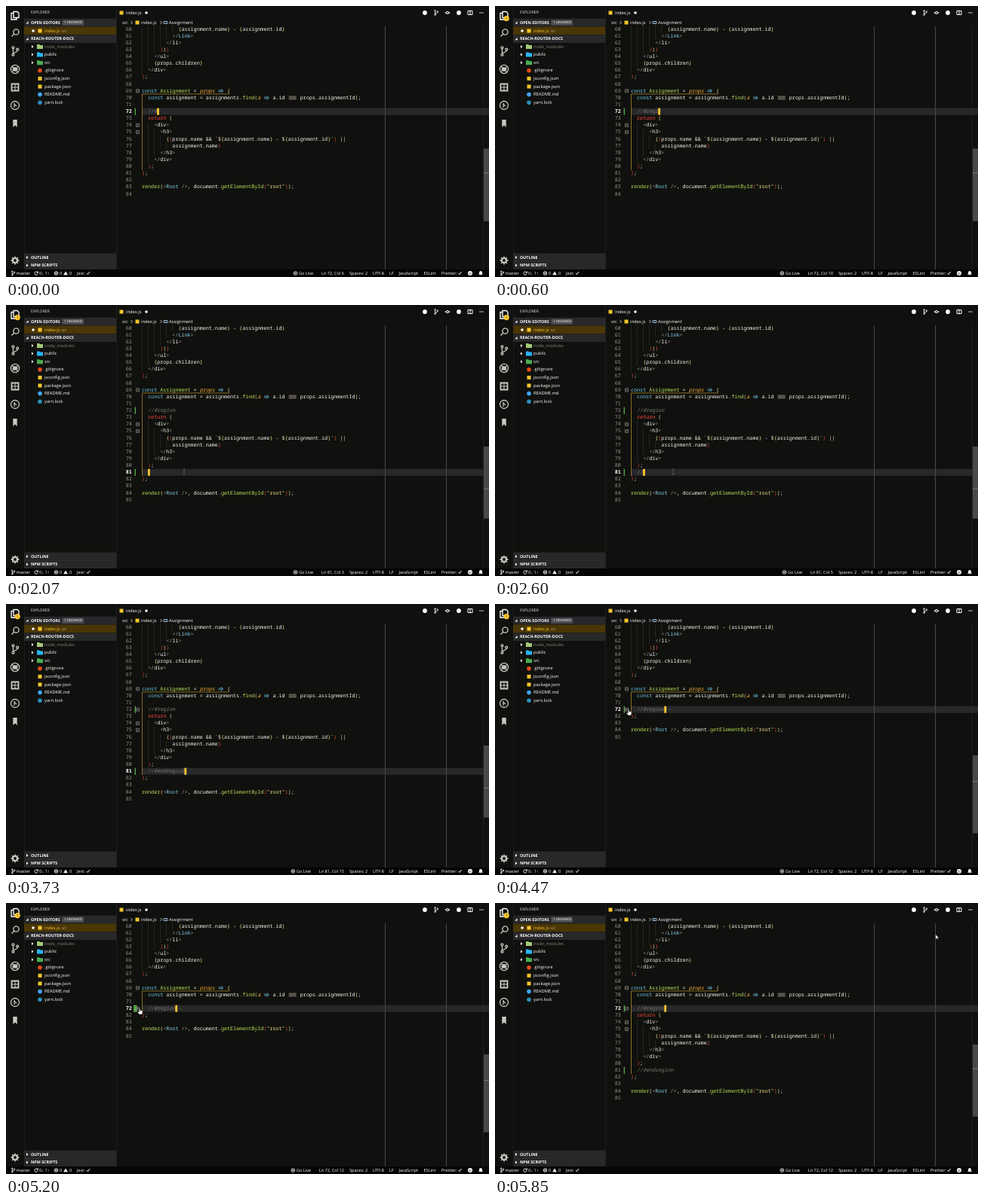
An HTML page with a canvas that plays this animation: 640x360 px, repeating every 5970 ms.

```html
<!DOCTYPE html>
<html lang="en">
<head>
<meta charset="utf-8">
<title>Folding a region</title>
<style>
  html, body { margin: 0; width: 100%; height: 100%; overflow: hidden; background: #10110e; }
  canvas { display: block; width: 640px; height: 360px; }
</style>
</head>
<body>
<canvas id="stage" width="640" height="360"></canvas>
<script>
const ctx = document.getElementById('stage').getContext('2d');
const LOOP = 5970, STEP = 1000 / 15;
const LEFT = 180, CHAR = 4.035, ROW = 9.125, FIRST = 60, TOP = 28, VIEW = 322;
const UI = '"Open Sans", sans-serif', MONO = '"Noto Sans Mono", monospace';
const BG = '#10110e', PANEL = '#28282b', WHITE = '#fff', GREY = '#92928c', GOLD = '#ffc72e', GREEN = '#55a049';

const HEAD = `            {assignment.name} - {assignment.id}
          </Link>
        </li>
      ))}
    </ul>
    {props.children}
  </div>
);

const Assignment = props => {
  const assignment = assignments.find(a => a.id === props.assignmentId);
`.split('\n');
const BODY = `  return (
    <div>
      <h3>
        {(props.name && \`\${assignment.name} - \${assignment.id}\`) ||
          assignment.name}
      </h3>
    </div>
  );`.split('\n');
const TAIL = ['};', '', 'render(<Root />, document.getElementById("root"));', ''];

// Steps (15 per second) at which keys are pressed
const REGION_KEYS = [4, 5, 7, 8, 10, 12];
const END_KEYS = [36, 39, 40, 43, 45, 47, 49, 51, 52, 53, 54, 55];
const typed = (keys, s) => keys.filter(k => k <= s).length;

const SYNTAX = new RegExp([
  /(^\s*\/\/.*)/, /(".*?"|`)/, /(\bconst\b|=>)/, /\b(return)\b/, /\b(props(?= =>)|a(?= =>))/,
  /(===|&&|\|\||\$|=)/, /(<\/?|\/?>)/, /([(){}])/, /(\w+(?=\()|Assignment(?= =))/,
  /((?<=<\/?)[A-Z]\w*)/, /(\w+|[.,;-])/
].map(r => r.source).join('|'), 'g');
const COLORS = ['#7c7c74', '#f0e08a', '#72cdf0', '#ff4a40', '#ffb03c',
  '#f0e4d0', '#a4a49e', '', '#bfe45c', '#86d2f2', '#f4f4ec'];
const BRACKETS = ['#f0de90', '#d84c3a'];

function text(str, x, y, color = WHITE, size = 5.8, font = UI, style = '500') {
  ctx.font = `${style} ${size}px ${font}`;
  ctx.fillStyle = color;
  ctx.fillText(str, x, y);
}
function rect(x, y, w, h, color) {
  ctx.fillStyle = color;
  ctx.fillRect(x, y, w, h);
}
function dot(x, y, r, color) {
  ctx.fillStyle = color;
  ctx.beginPath();
  ctx.arc(x, y, r, 0, 7);
  ctx.fill();
}
function line(d, color = WHITE, width = 0.8, x = 0, y = 0) {
  ctx.save();
  ctx.translate(x, y);
  ctx.strokeStyle = color;
  ctx.lineWidth = width;
  ctx.stroke(new Path2D(d));
  ctx.restore();
}
function shape(d, x, y, fill, stroke) {
  ctx.save();
  ctx.translate(x, y);
  const path = new Path2D(d);
  ctx.fillStyle = fill;
  ctx.fill(path);
  if (stroke) {
    ctx.strokeStyle = stroke;
    ctx.lineWidth = 0.6;
    ctx.stroke(path);
  }
  ctx.restore();
}
const ring = r => `M${r} 0A${r} ${r} 0 1 1 ${-r} 0A${r} ${r} 0 1 1 ${r} 0`;
const chevron = (x, y, open) => shape(open ? 'M1.6-1.6V1.6H-1.6Z' : 'M-1-2L1.5 0L-1 2Z', x, y, WHITE);
const fork = (x, y, k, color = WHITE, width = 0.9) => {
  const r = 0.22 * k;
  [[-0.4, -0.75], [-0.4, 0.75], [0.5, -0.4]].forEach(([a, b]) => line(ring(r), color, width, x + a * k, y + b * k));
  line(`M${-0.4 * k} ${-0.5 * k}V${0.5 * k}M${0.5 * k} ${-0.18 * k}Q${0.5 * k} ${0.2 * k} ${-0.4 * k} ${0.4 * k}`, color, width, x, y);
};

function activityBar(s) {
  const c = '#c8c8c4';
  line('M-2-5H3L5-3V3H-2ZM-2-3H-5V5.5H2V3', WHITE, 1.3, 12, 12.5);
  if (s >= 1) {
    dot(15.2, 16.6, 3.6, GOLD);
    text('1', 14, 16.8, '#111', 4.5);
  }
  line(ring(3.6) + 'M-2.6 2.6L-6 6', c, 1.4, 13.5, 34.5);
  fork(12, 60, 6.4, c, 1.3);
  line(ring(5.6) + 'M-4-4L4 4M-4 0H4M-3.5 3L3.5-3', c, 1.2, 12, 84);
  dot(12, 84, 2.8, c);
  line('M-4.5-4.5H4.5V4.5H-4.5Z', c, 1.8, 12, 108);
  line('M0-5V5M-5 0H5', c, 1, 12, 108);
  line(ring(5.5), c, 1.3, 12, 132);
  line('M-1-3V3M-1-1.5L2 1', c, 1.2, 12, 132);
  shape('M-2.7-5H2.7V5L0 2.5L-2.7 5Z', 12, 156, c);
  line(ring(3), c, 2.2, 12, 338);
  for (let i = 0; i < 8; i++) {
    const a = i * Math.PI / 4;
    dot(12 + 4.7 * Math.cos(a), 338 + 4.7 * Math.sin(a), 0.9, c);
  }
  rect(24, 0, 0.6, 350, '#242422');
}

function section(name, y, open) {
  rect(24, y - 5.3, 122, 10.6, PANEL);
  chevron(28, y, open);
  text(name, 33, y + 0.2, WHITE, 5.35, UI, 'bold');
}
function sidebar() {
  text('EXPLORER', 33, 8.7, '#e4e4e4', 5.2);
  section('OPEN EDITORS', 22, true);
  rect(74.5, 18.6, 28.5, 7, '#505053');
  text('1 UNSAVED', 77, 22.3, WHITE, 4.5);
  rect(24, 27.5, 122, 10.6, '#4a3606');
  dot(36, 33, 1.8, WHITE);
  rect(42.5, 30.5, 5, 5, '#f4c52c');
  text('index.js', 51, 33, GOLD);
  text('src', 73.5, 33.2, '#c4b484', 5);
  section('REACH-ROUTER-DOCS', 43.7, true);

  const files = [
    ['node_modules', '#a5c878', 'folder'], ['public', '#29b6f6', 'folder'], ['src', '#4caf50', 'folder'],
    ['.gitignore', '#e64a19'], ['jsconfig.json', '#f4c52c'], ['package.json', '#f4c52c'],
    ['README.md', '#42a5f5'], ['yarn.lock', '#2c8ebb']
  ];
  files.forEach(([name, color, kind], i) => {
    const y = 54 + i * 10.6;
    if (kind) {
      chevron(35, y, false);
      shape('M-4-3H-.8L.3-2H4V3H-4Z', 45, y, color);
    } else if (color === '#f4c52c') rect(42.5, y - 2.5, 5, 5, color);
    else dot(45, y, 2.8, color);
    text(name, 51, y, i ? WHITE : '#82827c');
  });

  section('OUTLINE', 334, false);
  section('NPM SCRIPTS', 344.6, false);
  rect(24, 339, 122, 0.5, '#3a3a3c');
  rect(146, 0, 0.7, 350, '#242422');
}

function header() {
  rect(150.5, 6.5, 5, 5, '#f4c52c');
  text('index.js', 159, 9);
  dot(186, 9, 1.8, WHITE);

  text('src', 154, 22);
  line('M-1-2L1 0L-1 2', WHITE, 0.7, 166.5, 22);
  rect(171.5, 19.5, 5, 5, '#f4c52c');
  text('index.js', 179, 22);
  line('M-1-2L1 0L-1 2', WHITE, 0.7, 205.5, 22);
  line('M-2.5-1.5H2.5V1.5H-2.5ZM-1 0H1', '#a8cdf0', 0.8, 211.5, 22);
  text('Assignment', 216, 22);

  dot(555, 9, 2.9, WHITE);
  fork(570, 9, 3.6);
  line('M-3.5 0H-1.5M1.5 0H3.5' + ring(1.5), WHITE, 1.1, 585, 9);
  dot(600, 9, 2.9, WHITE);
  line('M-3-2.5H3V2.5H-3ZM0-2.5V2.5', WHITE, 1, 615, 9);
  [-2, 0, 2].forEach(d => dot(630 + d, 9, 0.7, WHITE));
}

function statusBar(caret) {
  const y = 355.3, t = (str, x) => text(str, x, y, WHITE, 5.6);
  rect(0, 350, 640, 10, '#050505');
  fork(9.5, 355, 3.2);
  t('master', 13.5);
  line('M2-1A2.2 2.2 0 1 0 2.2 .6M2.4-2.5V-.7H.6', WHITE, 0.9, 40, 355);
  t('0↓ 1↑', 44);
  line(ring(2.3) + 'M-1-1L1 1M1-1L-1 1', WHITE, 0.9, 66.5, 355);
  t('0', 71);
  shape('M0-2.6L2.8 2.3H-2.8Z', 79, 355, WHITE);
  t('0', 84);
  t('Jest:', 94);
  line('M-1.8 0L-.5 1.6L2-2', WHITE, 1, 109, 355);

  const pos = `Ln ${caret.ln}, Col ${caret.col}`;
  ctx.font = `500 5.6px ${UI}`;
  const x = 448 - ctx.measureText(pos).width;
  t(pos, x);
  line(ring(2.4), WHITE, 0.8, x - 34.5, 355);
  dot(x - 34.5, 355, 1.1, WHITE);
  t('Go Live', x - 30);
  [['Spaces: 2', 455], ['UTF-8', 486], ['LF', 508], ['JavaScript', 520.5], ['ESLint', 553.5], ['Prettier:', 577]]
    .forEach(([str, at]) => t(str, at));
  line('M-1.8 0L-.5 1.6L2-2', WHITE, 1, 601.5, 355);
  dot(615, 355, 3, WHITE);
  line('M-1.5.6Q0 2.4 1.5.6', BG, 0.7, 615, 355);
  dot(614, 354.3, 0.5, BG);
  dot(616, 354.3, 0.5, BG);
  shape('M-3 1.7L-2 .4V-.8Q-1.8-3 0-3Q1.8-3 2-.8V.4L3 1.7ZM-.8 2.2H.8L0 3Z', 629, 355, WHITE);
}

function codeLine(str, y) {
  const indent = str.search(/\S/);
  for (let col = 0; col < indent; col += 2) rect(LEFT + col * CHAR, y - 4.56, 0.6, ROW, '#33332f');

  let depth = 0;
  for (const m of str.matchAll(SYNTAX)) {
    const group = m.slice(1).findIndex(Boolean);
    const token = m[0].trimStart();
    const x = LEFT + (m.index + m[0].length - token.length) * CHAR;
    let color = COLORS[group];
    if (group === 7) {
      const level = '({'.includes(token) ? depth++ : --depth;
      color = BRACKETS[Math.abs(level) % 2];
    }
    if (token === '=>') line('M.6-.9H5.8M.6 .9H5.8M4.4-2.3L7 0L4.4 2.3', color, 0.7, x, y);
    else if (token === '===') line('M1-1.8H11M1 0H11M1 1.8H11', color, 0.55, x, y);
    else {
      const style = group === 0 || group === 4 ? 'italic' : '500';
      [...token].forEach((ch, i) => text(ch, x + i * CHAR, y, color, 6.72, MONO, style));
    }
  }
}

function editor(s, caret, folded) {
  const region = '  //#' + 'region'.slice(0, typed(REGION_KEYS, s));
  const extra = s >= 31 ? ['  ' + '//#endregion'.slice(0, typed(END_KEYS, s))] : [];
  let rows = [...HEAD, region, ...BODY, ...extra, ...TAIL].map((code, i) => ({ code, n: FIRST + i }));
  if (folded) rows = rows.filter(r => r.n <= 72 || r.n > 81);
  const rowY = i => 30.7 + i * ROW;
  const caretY = rowY(rows.findIndex(r => r.n === caret.ln));

  rect(LEFT, caretY - 4.5, 460, 9, PANEL);
  rect(502, 27, 1, 323, '#484846');
  rect(583, 27, 1, 323, '#484846');

  rows.forEach(({ code, n }, i) => {
    const y = rowY(i), current = n === caret.ln;
    text(n, 158.8, y, current ? WHITE : GREY, 6.72, MONO, current ? 'bold' : '500');
    codeLine(code, y);
    if (n === 72 || (n === 81 && extra.length)) {
      const wide = n === 72 && s >= 75 && s < 79;
      rect(wide ? 169 : 170.6, y - 4.5, wide ? 4.5 : 1.4, 9.1, GREEN);
    }
    if ([69, 74, 75].includes(n) || (n === 72 && s >= 56)) {
      const plus = n === 72 && folded ? 'M0-1.2V1.2' : '';
      line('M-2-2H2V2H-2ZM-1.2 0H1.2' + plus, '#9a9a96', 0.7, 174.5, y);
    }
  });

  // Active scope guide
  const close = rowY(rows.findIndex(r => r.code === '};'));
  line(`M${LEFT + 116} 116.9H180.5V${close - 4.5}`, '#b5922c', 0.7);

  if (folded) text('⋯', 227.5, caretY, GREY, 6, MONO);
  rect(LEFT + (caret.col - 1) * CHAR - 0.1, caretY - 4.5, 2.8, 9, GOLD);

  // Scrollbar and overview marks
  const total = rows[rows.length - 1].n - (folded ? 9 : 0) + 34.5;
  const at = n => TOP + VIEW * n / total;
  rect(632, 27, 0.6, 323, '#2a2a2a');
  rect(633, at(59.4), 7, VIEW * 35.5 / total, '#484848');
  rect(633, at(caret.ln - 0.9), 7, 1, '#7c7c7a');
}

function glide(s, from, to, a, b) {
  const k = Math.min(1, Math.max(0, (s - from) / (to - from)));
  const e = k * k * (3 - 2 * k);
  return a.map((v, i) => v + (b[i] - v) * e);
}
function pointer(s) {
  if (s < 17) return;
  if (s < 64) {
    let p = glide(s, 16, 22, [420, 120], [262, 220]);
    if (s >= 25) p = glide(s, 25, 28, [262, 220], [236, 221.5]);
    if (s >= 60) p = glide(s, 59, 64, [236, 221.5], [177, 142]);
    line('M-1.3-3.5H1.3M0-3.5V3.5M-1.3 3.5H1.3', '#77776f', 0.6, ...p);
  } else if (s < 80) {
    shape('M-.8-3.2Q0-4 .7-3.2V-.5L3.4.1Q4.2.4 4 1.6L3.4 5H-.6L-2.9 1.8Q-2.6.7-.8 1.8Z', 177, 143, '#fff', '#111');
  } else {
    const p = glide(s, 79, 86, [177, 142], [583.6, 41.5]);
    shape('M0 0V6.6L1.5 5.2L2.5 7.5L3.5 7L2.6 4.9H4.7Z', ...p, '#fff', '#111');
  }
}

function caretAt(s) {
  if (s < 26) return { ln: 72, col: 6 + typed(REGION_KEYS, s) };
  if (s < 31) return { ln: 80, col: 5 };
  if (s < 66) return { ln: 81, col: 3 + typed(END_KEYS, s) };
  return { ln: 72, col: 12 };
}

function draw(now) {
  const s = Math.floor((now % LOOP + 17) / STEP);
  const folded = (s >= 66 && s < 71) || (s >= 75 && s < 79);
  const caret = caretAt(s);
  ctx.textBaseline = 'middle';
  ctx.textRendering = 'geometricPrecision';
  rect(0, 0, 640, 360, BG);
  activityBar(s);
  sidebar();
  header();
  editor(s, caret, folded);
  statusBar(caret);
  pointer(s);
}

const start = performance.now();
function tick() {
  draw(performance.now() - start);
  requestAnimationFrame(tick);
}
tick();
</script>
</body>
</html>
```
